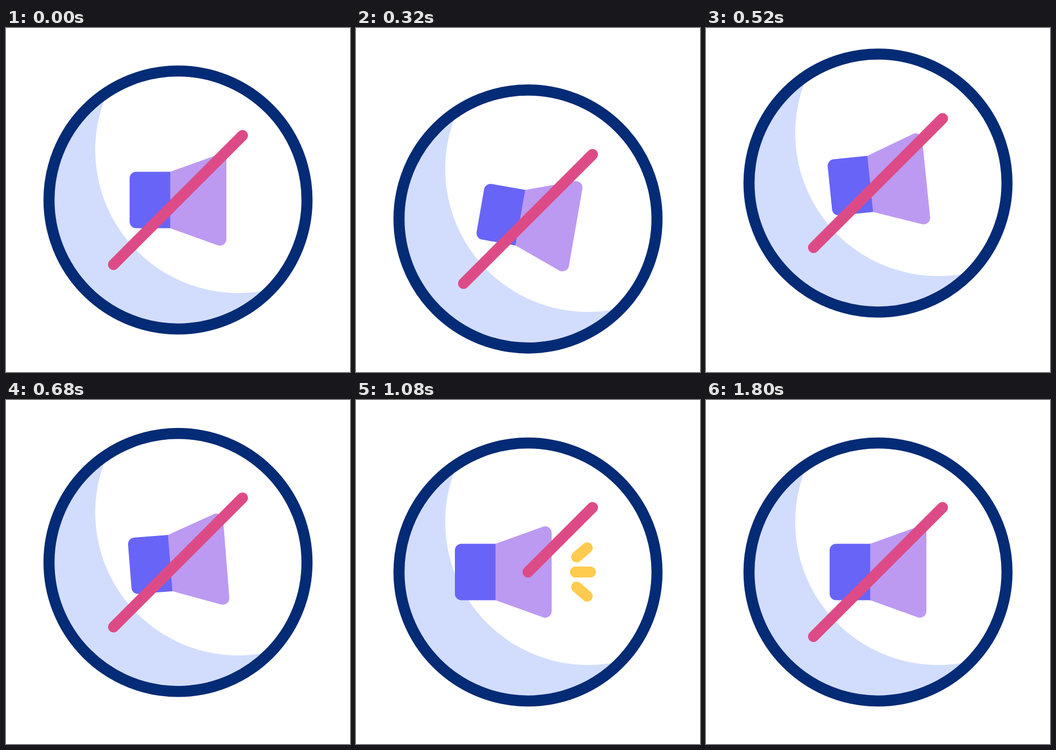
Recreate the animation shown at these times as an HTML page. Size 640 px wide and 640 px high, loop 2000 ms.

```html
<!DOCTYPE html>
<html lang="en">
<head>
<meta charset="utf-8">
<title>Sound off</title>
<style>
  html, body { margin: 0; width: 100%; height: 100%; overflow: hidden; background: #fff; }
  svg { display: block; width: 100%; height: 100%; }
</style>
</head>
<body>
<svg viewBox="0 0 640 640">
  <clipPath id="disc"><circle cx="320" cy="320" r="240"/></clipPath>
  <g id="badge">
    <g clip-path="url(#disc)">
      <circle cx="320" cy="320" r="240" fill="#d2ddfd"/>
      <circle cx="432" cy="227" r="266" fill="#fff"/>
    </g>
    <circle cx="320" cy="320" r="240" fill="none" stroke="#042b75" stroke-width="20.6"/>
    <g id="speaker">
      <path fill="#6864f7" d="M306 267.5H242A12 12 0 0 0 230 279.5V360.5A12 12 0 0 0 242 372.5H306Z"/>
      <path fill="#bc9af2" d="M305.5 267.5L393.9 235.7A12 12 0 0 1 410 247V393A12 12 0 0 1 393.9 404.3L305.5 372.5Z"/>
    </g>
    <g fill="none" stroke-width="20.5" stroke-linecap="round">
      <g id="rays" stroke="#ffcb4f"><path/><path/><path/></g>
      <path id="slash" stroke="#dd4b86"/>
    </g>
  </g>
</svg>
<script>
const LOOP = 2000, STEP = 40;
const $ = id => document.getElementById(id);
const badge = $('badge'), speaker = $('speaker'), slash = $('slash');
const rays = [...$('rays').children];

// Each ray: x1, y1, x2, y2 at full length
const RAYS = [
  [410.5, 292, 437, 269],
  [408.3, 320, 445.7, 320],
  [410.5, 348, 437, 371]
];
const SLASH = [200, 440, 440, 200];

// Smooth 0..1 progress between two times
function ease(t, from, to) {
  const u = Math.min(1, Math.max(0, (t - from) / (to - from)));
  return u * u * (3 - 2 * u);
}

// Eased value through [time, value] keys
function track(t, keys) {
  let v = keys[0][1];
  for (let i = 1; i < keys.length; i++)
    v += (keys[i][1] - keys[i - 1][1]) * ease(t, keys[i - 1][0], keys[i][0]);
  return v;
}

// Shows the part of a line between fractions a and b
function trim(el, [x1, y1, x2, y2], a, b) {
  const at = f => `${x1 + (x2 - x1) * f} ${y1 + (y2 - y1) * f}`;
  el.setAttribute('d', b - a > 0.001 ? `M${at(a)}L${at(b)}` : '');
}

function draw(t) {
  const lift = track(t, [[40, 0], [280, 39.5], [560, -35.6], [800, 0]]);
  const tilt = track(t, [[40, 0], [300, 10.2], [580, -8], [800, 0]]);
  const slide = track(t, [[800, 0], [1040, -46], [1200, -46], [1440, 0]]);
  badge.setAttribute('transform', `translate(0 ${lift})`);
  speaker.setAttribute('transform', `translate(${slide} 0) rotate(${tilt} 320 320)`);

  if (t < 1320) trim(slash, SLASH, ease(t, 840, 1320), 1);
  else trim(slash, SLASH, 0, ease(t, 1320, 1800));

  rays.forEach((el, i) => trim(el, RAYS[i], ease(t, 1160, 1400), ease(t, 920, 1160)));
}

const start = performance.now();
function tick() {
  const t = (performance.now() - start) % LOOP;
  draw(Math.floor(t / STEP) * STEP);
  requestAnimationFrame(tick);
}
tick();
</script>
</body>
</html>
```
